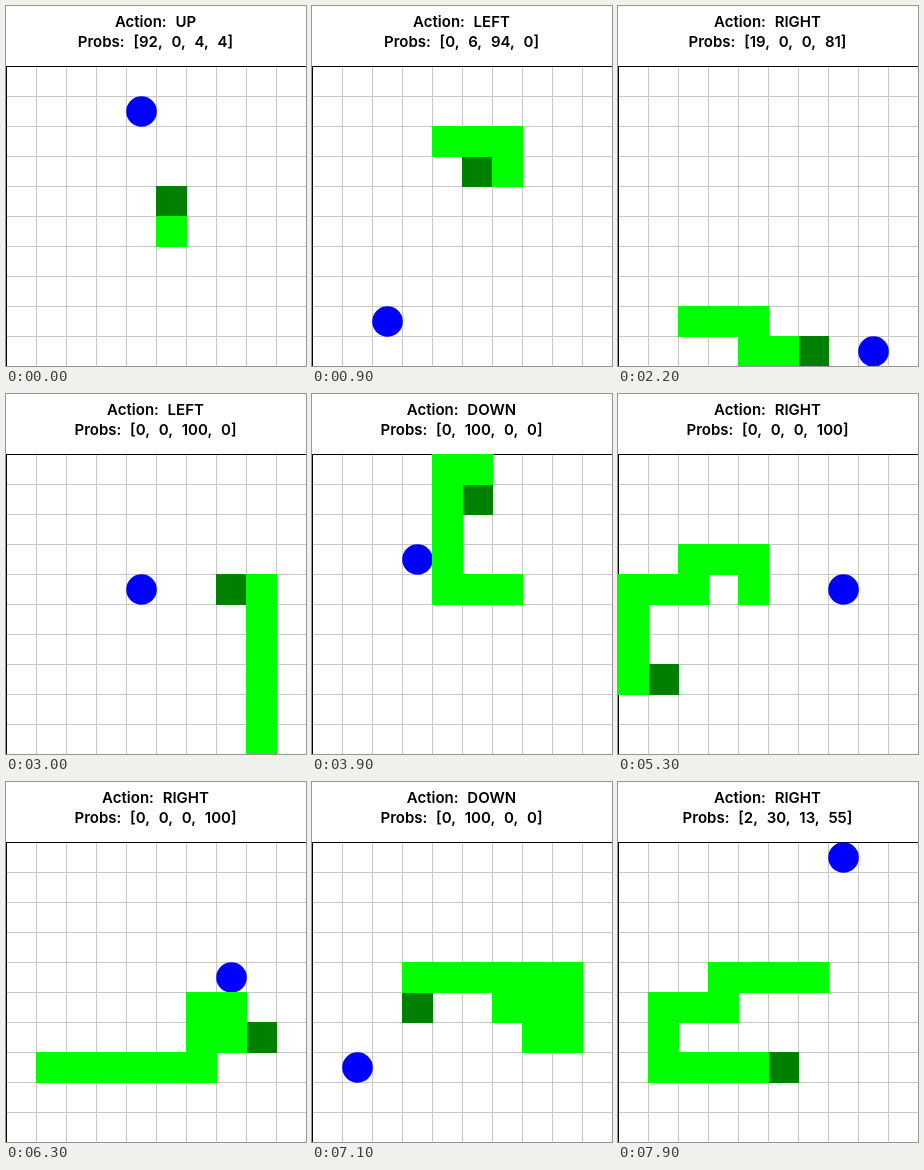
These frames come from a looping animation (300 px wide and 360 px high, 8000 ms). An HTML page with a canvas:

```html
<!DOCTYPE html>
<html lang="en">
<head>
<meta charset="utf-8">
<title>Snake agent</title>
<style>
  html, body { margin: 0; width: 100%; height: 100%; overflow: hidden; background: #fff; }
  canvas { display: block; }
</style>
</head>
<body>
<canvas id="stage" width="300" height="360"></canvas>
<script>
const ctx = document.getElementById('stage').getContext('2d');
const CELL = 30, TOP = 60, STEP_MS = 100;

const DIRS = {
  U: ['UP', 0, -1],
  D: ['DOWN', 0, 1],
  L: ['LEFT', -1, 0],
  R: ['RIGHT', 1, 0]
};
const MOVES = 'UUUULDRRDL' + 'LLLDDDDDRR' + 'DRRRRUUUUU' + 'LLLLUUUURD' +
              'DDDLULLDLL' + 'DDDRRRRRRU' + 'URDRUULLLL' + 'LDLLDDRRRR';
const MEALS = [4, 7, 9, 17, 24, 33, 38, 45, 53, 66, 75]; // steps at which food is eaten
const LAST_FOOD = [7, 0];

// Steps where the policy is unsure, in the order up, down, left, right
const UNSURE = {
  0: [92, 0, 4, 4],
  9: [0, 6, 94, 0],
  22: [19, 0, 0, 81],
  79: [2, 30, 13, 55]
};

// path[s + 1] is the head's cell at step s
const path = [[5, 5]];
for (const move of MOVES) {
  const [x, y] = path[path.length - 1];
  const [, dx, dy] = DIRS[move];
  path.push([x + dx, y + dy]);
}

function square([x, y], color) {
  ctx.fillStyle = color;
  ctx.fillRect(x * CELL, TOP + y * CELL, CELL + 1, CELL + 1);
}

function drawGrid() {
  ctx.fillStyle = '#fff';
  ctx.fillRect(0, 0, 300, 360);
  ctx.fillStyle = '#c8c8c8';
  for (let p = CELL; p < 300; p += CELL) {
    ctx.fillRect(p, TOP, 1, 300);
    ctx.fillRect(0, TOP + p, 300, 1);
  }
  ctx.fillStyle = '#000';
  ctx.fillRect(0, TOP, 300, 1);
  ctx.fillRect(0, TOP, 1, 300);
}

function drawFood([x, y]) {
  ctx.fillStyle = '#00f';
  ctx.beginPath();
  ctx.arc(x * CELL + 15.5, TOP + y * CELL + 15.5, 15.3, 0, 2 * Math.PI);
  ctx.fill();
}

function drawText(step) {
  const move = MOVES[step];
  const probs = UNSURE[step] || [...'UDLR'].map(d => d === move ? 100 : 0);
  ctx.fillStyle = '#000';
  ctx.font = '600 15px Inter, sans-serif';
  ctx.wordSpacing = '5px';
  ctx.textAlign = 'center';
  ctx.fillText('Action: ' + DIRS[move][0], 149.5, 21);
  ctx.fillText(`Probs: [${probs.join(', ')}]`, 149.5, 41);
}

function draw(step) {
  const eaten = MEALS.filter(m => m <= step).length;
  const head = step + 1;
  const tail = Math.max(0, head - 1 - eaten);
  drawGrid();
  drawFood(eaten < MEALS.length ? path[MEALS[eaten] + 1] : LAST_FOOD);
  square(path[head], '#008000');
  for (let i = tail; i < head; i++) square(path[i], '#0f0');
  drawText(step);
}

function tick() {
  draw(Math.floor(performance.now() / STEP_MS) % MOVES.length);
  requestAnimationFrame(tick);
}
tick();
</script>
</body>
</html>
```
